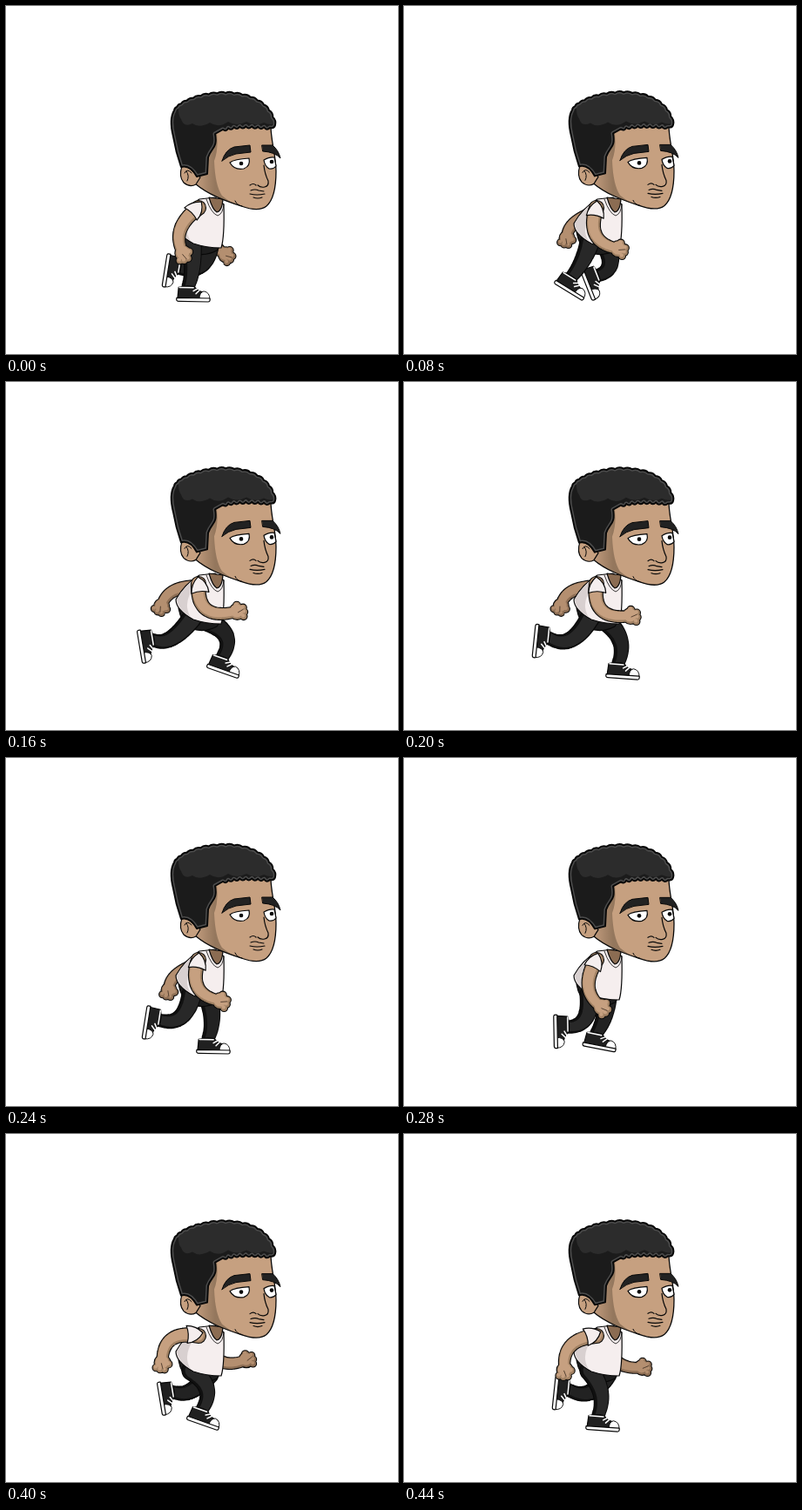
An HTML page with a canvas for the animation above (0.48 s loop, 450x400 px).

```html
<!DOCTYPE html>
<html lang="en">
<head>
<meta charset="utf-8">
<title>Running character</title>
<style>
  html, body { margin: 0; width: 100%; height: 100%; overflow: hidden; background: #fff; }
  canvas { display: block; }
</style>
</head>
<body>
<canvas id="stage" width="450" height="400"></canvas>
<script>
const ctx = document.getElementById('stage').getContext('2d');
const STEP_MS = 40, STEPS = 12, FAR_LEG_X = 23;
const INK = '#080808', SKIN = '#c6a080', SKIN_SHADE = '#a08062', SHIRT = '#f5eeee';
const { PI, sin, cos } = Math;

// Periodic motion: a mean plus [cosine, sine] amplitudes of successive harmonics.
const wave = (phase, mean, ...harmonics) => harmonics.reduce(
  (sum, [c, s = 0], i) => sum + c * cos((i + 1) * phase) + s * sin((i + 1) * phase), mean);

const polar = ([x, y], degrees, length) => [
  x + length * cos(degrees * PI / 180), y + length * sin(degrees * PI / 180)];

function legPose(phase, dx) {
  return {
    knee: [dx + wave(phase, 210, [10, -16], [-2, -.6], [-3.5, -2]),
      wave(phase, 298, [-2], [4, 1], [2])],
    ankle: [dx + wave(phase, 196.5, [19, -18.3], [-2.6, -.7], [-2.7, -2.7]),
      wave(phase, 309.3, [10.1, -5.2], [2.2, 2.3], [0, -2.8])],
    tilt: wave(phase, 50, [-49, 7])
  };
}

// Phase 0 is the furthest forward reach of the arm.
function nearArmPose(phase) {
  const shoulder = [221, 232];
  const elbow = polar(shoulder, wave(phase, 121, [-45], [9], [-4]), 35);
  const hand = polar(elbow, wave(phase, 49, [-53]), wave(phase, 32, [4], [3]));
  return { shoulder, elbow, hand };
}

function farArmPose(phase) {
  const shoulder = [226, 236];
  const elbow = polar(shoulder, wave(phase, 118, [-68], [0], [8]), 35);
  const hand = polar(elbow, wave(phase, 68, [-66], [-13]), wave(phase, 24, [4], [4]));
  return { shoulder, elbow, hand };
}

function shape(d, fill, stroke, width = 1.2) {
  const path = new Path2D(d);
  if (fill) { ctx.fillStyle = fill; ctx.fill(path); }
  if (stroke) { ctx.strokeStyle = stroke; ctx.lineWidth = width; ctx.stroke(path); }
}

// Circles along a curve that bends close to the middle joint.
function limb(start, bend, end, r0, r1) {
  const count = 48;
  const control = bend.map((v, k) => 1.5 * v - .25 * (start[k] + end[k]));
  return Array.from({ length: count + 1 }, (_, i) => {
    const t = i / count, u = 1 - t;
    const at = k => u * u * start[k] + 2 * u * t * control[k] + t * t * end[k];
    return [at(0), at(1), r0 + (r1 - r0) * t];
  });
}

function fillCircles(circles, color, grow, dx = 0, dy = 0) {
  ctx.beginPath();
  for (const [x, y, r] of circles) {
    ctx.moveTo(x + dx + r + grow, y + dy);
    ctx.arc(x + dx, y + dy, r + grow, 0, 2 * PI);
  }
  ctx.fillStyle = color;
  ctx.fill();
}

function solid(circles, light, shade, dx, dy) {
  fillCircles(circles, INK, .6);
  fillCircles(circles, shade, -.5);
  fillCircles(circles, light, -2, dx, dy);
}

function shoe([x, y], degrees) {
  ctx.save();
  ctx.translate(x, y);
  ctx.rotate(degrees * PI / 180);
  shape('M-12 2 Q-3 -1 6 1 Q10 6 16 7 L16 15 L-13 15 Z', '#202020', INK);
  shape('M12 15 Q12 7 17 6 Q24 7 24 15 Z', '#fff', INK, .9);
  shape('M-14 14 L24 14 Q25 18 22 18 L-12 18 Q-15 18 -14 14 Z', '#fff', INK);
  shape('M-11 2 L5 2 M5 6 L10 3 M8 9 L12 5', null, '#fff', 1.5);
  ctx.restore();
}

function leg({ knee, ankle, tilt }, hip, light) {
  solid(limb(hip, knee, [ankle[0] - 1, ankle[1]], 11, 7), light, '#101010', 1.6, 0);
  shoe(ankle, tilt);
}

function arm({ shoulder, elbow, hand }, light, shade, size) {
  const angle = Math.atan2(hand[1] - elbow[1], hand[0] - elbow[0]);
  const place = (along, across, r) => [
    hand[0] + (cos(angle) * along - sin(angle) * across) * size,
    hand[1] + (sin(angle) * along + cos(angle) * across) * size, r * size];
  const circles = limb(shoulder, elbow, hand, 8.5 * size, 6.5 * size);
  circles.push(place(0, 0, 9.5), place(0, -7, 4.5));
  for (let finger = -1; finger <= 1; finger++) {
    circles.push(place(8 - Math.abs(finger), 1 + finger * 5, 4.2));
  }
  solid(circles, light, shade, -.5, -.9);
  const [x1, y1] = place(1, 1), [x2, y2] = place(7, -2);
  shape(`M${x1} ${y1} L${x2} ${y2}`, null, '#49372a', .9);
}

function torso() {
  shape('M222 222 Q205 232 195 250 Q195 262 215 273 Q230 278 247 278 Q251 266 250 228 L240 220 Z', SHIRT, INK);
  shape('M218 225 Q204 235 196 250 Q197 261 212 270 Q203 257 214 238 Z', '#d8d0d0');
  shape('M233 220 Q237 234 242 237 Q248 236 249 222 Z', '#8b6c52', INK);
  shape('M230 222 Q236 239 243 241 Q249 239 250 228', null, INK, .8);
}

function sleeve(x, y, [ex, ey]) {
  ctx.save();
  ctx.translate(x, y);
  ctx.rotate(Math.atan2(ey - y, ex - x));
  shape('M14 -10 Q2 -10 -5 0 Q2 9 13 10 Q10 0 14 -10 Z', SHIRT, INK);
  ctx.restore();
}

// Small rounded locks along a cubic curve.
function locks(path, curve, count, bulge) {
  const at = (t, k) => curve.reduce(
    (sum, p, i) => sum + [1, 3, 3, 1][i] * t ** i * (1 - t) ** (3 - i) * p[k], 0);
  for (let i = 1; i <= count; i++) {
    const [x0, y0, x, y] = [at((i - 1) / count, 0), at((i - 1) / count, 1), at(i / count, 0), at(i / count, 1)];
    path.quadraticCurveTo((x0 + x) / 2 + (y - y0) * bulge, (y0 + y) / 2 - (x - x0) * bulge, x, y);
  }
}

const hairPath = new Path2D('M201 185 Q195 168 192 150 Q187 130 193 120');
locks(hairPath, [[193, 120], [205, 98], [300, 83], [309, 137]], 16, .3);
hairPath.quadraticCurveTo(308, 141, 303, 140);
locks(hairPath, [[303, 140], [285, 138], [265, 137], [249, 142]], 8, .6);
hairPath.lineTo(240, 147);
hairPath.bezierCurveTo(243, 164, 236, 162, 232, 174);
hairPath.lineTo(231, 193);
hairPath.lineTo(219, 196);
hairPath.quadraticCurveTo(211, 182, 201, 185);
hairPath.closePath();

function hair() {
  ctx.save();
  ctx.fillStyle = '#1b1b1b';
  ctx.fill(hairPath);
  ctx.clip(hairPath);
  shape('M203 90 L315 90 L315 132 Q305 139 296 134 Q286 139 276 133 Q265 139 255 133 Q244 141 234 134 Q222 141 214 135 Q204 140 201 130 Q194 122 203 90 Z', '#2c2c2c');
  ctx.strokeStyle = '#4c4c4c';
  ctx.lineWidth = 5;
  ctx.stroke(hairPath);
  ctx.restore();
  ctx.strokeStyle = INK;
  ctx.lineWidth = 2;
  ctx.stroke(hairPath);
}

const FACE = 'M238 140 L304 138 C304 155 310 172 310 190 C310 208 307 223 299 230 C294 234 284 235 270 230 C252 224 232 217 217 204 L220 190 Z';

function eye(outline, pupilX, pupilY) {
  shape(outline, '#fff', INK);
  shape(`M${pupilX} ${pupilY} h.01`, null, INK, 4.6);
}

function face() {
  const shade = ctx.createLinearGradient(220, 0, 240, 0);
  shade.addColorStop(0, '#bd987a');
  shade.addColorStop(1, '#94775d');
  shape(FACE, SKIN);
  ctx.save();
  ctx.clip(new Path2D(FACE));
  shape('M215 140 L241 140 Q245 162 239 178 Q240 206 248 218 Q258 226 275 236 L215 236 Z', shade);
  ctx.restore();
  shape(FACE, null, INK, 1.3);

  eye('M257 180 Q262 176 279 175 Q281 184 273 187 Q262 189 257 180 Z', 270, 181);
  eye('M296 177 Q303 173 308 174 L310 184 Q307 188 302 187 Q297 184 296 177 Z', 305, 179);
  shape('M248 178 Q252 165 262 162 L280 160 L281 168 L264 170 Q255 172 248 178 Z', '#222', INK, 1);
  shape('M294 160 L306 160 Q313 166 315 175 Q309 168 295 167 Z', '#222', INK, 1);

  shape('M296 183 Q297 193 301 201 Q302 207 297 208 Q292 209 289 206 M280 206 Q284 203 287 206', null, INK);
  shape('M281 212 Q286 210 290 212 L296 213 M280 216 Q288 218 297 216 M284 220 Q289 222 294 220', null, INK, 1.1);
  shape('M263 224 Q265 229 271 230', null, INK, 1);
}

function head(phase) {
  ctx.save();
  ctx.translate(0, -.7 * sin(phase));
  face();
  shape('M202 184 Q198 196 204 203 Q211 209 218 205 L223 197 L213 182 Z', SKIN, INK);
  shape('M205 192 Q208 186 213 192 M207 190 Q211 195 208 201', null, INK, 1);
  hair();
  ctx.restore();
}

function draw(time) {
  const step = Math.floor(time / STEP_MS) % STEPS;
  const phase = 2 * PI * step / STEPS;
  const armPhase = phase - 2 * PI / 3;
  const nearArm = nearArmPose(armPhase);
  ctx.fillStyle = '#fff';
  ctx.fillRect(0, 0, 450, 400);
  arm(farArmPose(armPhase + PI), '#b48f70', '#8d6e54', .95);
  leg(legPose(phase + PI, FAR_LEG_X), [233, 276], '#222');
  shape('M198 260 Q201 277 212 283 Q227 289 242 281 L247 274 Z', '#1d1d1d', INK);
  leg(legPose(phase, 0), [213, 272], '#282828');
  torso();
  arm(nearArm, SKIN, SKIN_SHADE, 1);
  sleeve(221, 229, nearArm.elbow);
  head(phase);
}

ctx.lineJoin = ctx.lineCap = 'round';
function loop() {
  draw(performance.now());
  requestAnimationFrame(loop);
}
loop();
</script>
</body>
</html>
```
